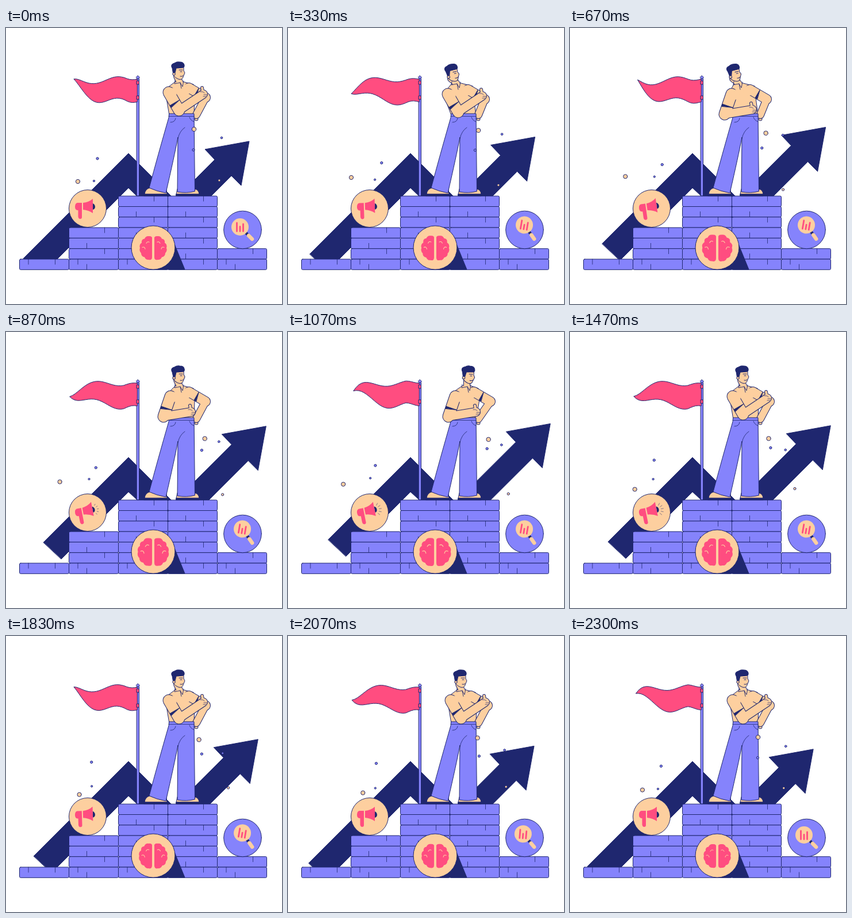
An HTML page with a canvas for the animation above (2.33 s loop, 480 by 480 pixels).

```html
<!DOCTYPE html>
<html lang="en">
<head>
<meta charset="utf-8">
<style>
  html, body { margin: 0; width: 100%; height: 100%; overflow: hidden; background: #fff; }
  canvas { display: block; width: 480px; height: 480px; }
</style>
</head>
<body>
<canvas id="stage" width="480" height="480"></canvas>
<script>
const ctx = document.getElementById('stage').getContext('2d');
const LOOP = 2330, FLAG_PERIOD = 606, TAU = 2 * Math.PI;
const NAVY = '#1f276f', BLUE = '#8583fc', PEACH = '#fdcf9f', PINK = '#ff4d80';

// Smooth 0 to 1 between two times
function ease(t, from, to) {
  const u = Math.min(1, Math.max(0, (t - from) / (to - from)));
  return (1 - Math.cos(Math.PI * u)) / 2;
}
// Rises over [a, b], falls over [c, d]
const pulse = (t, a, b, c, d) => ease(t, a, b) - ease(t, c, d);

function paint(path, fill, stroke = NAVY, width = 1) {
  if (fill) { ctx.fillStyle = fill; ctx.fill(path); }
  if (stroke) { ctx.strokeStyle = stroke; ctx.lineWidth = width; ctx.stroke(path); }
}
const shape = (d, fill, stroke) => paint(new Path2D(d), fill, stroke);
const poly = (points, fill, stroke) => shape('M' + points.join('L') + 'Z', fill, stroke);
const line = (d, color = NAVY, width = 1) => paint(new Path2D(d), null, color, width);
function disc(x, y, r, fill, stroke) {
  const p = new Path2D();
  p.arc(x, y, r, 0, TAU);
  paint(p, fill, stroke);
}
function turned(x, y, angle, draw) {
  ctx.save();
  ctx.translate(x, y);
  ctx.rotate(angle);
  draw();
  ctx.restore();
}
// Segments [from, to, width] share one outline
function limb(...segments) {
  for (const [color, extra] of [[NAVY, 1], [PEACH, -1]])
    for (const [a, b, w] of segments) line(`M${a}L${b}`, color, w + extra);
}
// Dark sleeve opening across the limb from a to b
function cuff([ax, ay], [bx, by], at, half) {
  const len = Math.hypot(bx - ax, by - ay), dx = (bx - ax) / len, dy = (by - ay) / len;
  const x = ax + (bx - ax) * at, y = ay + (by - ay) * at;
  const left = [x - dy * half, y + dx * half], right = [x + dy * half, y - dx * half];
  poly([right, left, [left[0] + dx * 4, left[1] + dy * 4]], NAVY);
}

function drawArrow(t) {
  const d = 33.5 * pulse(t, 0, 1130, 1250, 2350), tail = 1.2 * d, sink = .07 * d;
  const head = [[363, 229], [346, 211], [423, 197], [409, 274], [392, 257]]
    .map(([x, y]) => [x + d, y - 1.13 * d]);
  ctx.save();
  ctx.beginPath();
  ctx.rect(0, 0, 480, 403);
  ctx.clip();
  poly([[30 + tail, 401 - tail], [213, 218], [293.5 - sink, 298.5 - sink], ...head,
    [293, 356 - 2 * sink], [213, 278], [61 + tail, 430 - tail]], NAVY);
  ctx.restore();
}

function drawFlag(t) {
  shape('M227.5 88H231.5V292H227.5Z', BLUE);
  const wave = s => Math.cos(TAU * ((s - .3) / .68 - t / FLAG_PERIOD));
  const reach = 114 - 4 * wave(1);
  const top = [], bottom = [];
  for (let s = 0; s <= 1.001; s += .04) {
    const x = 228 - s * reach, grip = Math.min(1, 5 * s), whip = s ** 6;
    top.push([x, 89 + 12.5 * s ** 4 - wave(s) * grip * (4.5 + 8.5 * whip)]);
    bottom.unshift([x, 128.5 - 27 * s ** 3.5 - wave(s) * grip * (6 + 7 * whip)]);
  }
  poly([...top, ...bottom], PINK);
  for (const y of [92, 118]) shape(`M227.5 ${y}h4v6h-4Z`, PINK);
  shape('M229.5 83l3 3l-3 3l-3 -3Z', BLUE);
}

function drawBlocks() {
  [1, 4, 7, 7, 2].forEach((rows, col) => {
    const x = 23.5 + col * 86;
    for (let r = 0; r < rows; r++) {
      const y = 420.3 - (rows - r) * 18.3;
      const p = new Path2D();
      p.roundRect(x, y, 86, 18.3, 2);
      paint(p, BLUE);
      line(r % 2 ? `M${x + 31} ${y + 9}v9` : `M${x + 62} ${y}v9`, NAVY, .8);
      if (r === rows - 1) line(`M${x + 15.5} ${y}v9`, NAVY, .8);
    }
  });
  poly([[293, 376], [311, 420], [262, 420]], NAVY);
}

function drawMegaphone(t) {
  disc(142, 314, 32.5, PEACH);
  turned(142, 312, -.2 * pulse(t, 100, 1000, 1470, 1950), () => {
    shape('M-10 -8H-18Q-22 -7 -22 -1Q-22 5 -16.5 5V16Q-16 20 -13 20Q-10 20 -10 17Z', PINK, null);
    shape('M9 -7Q13 -5 13 -1Q13 3 9 4Z', NAVY, null);
    shape('M-8 -8Q2 -9 9 -15V10Q2 5 -8 4Z', PINK, null);
    const ray = pulse(t, 700, 1000, 1500, 1750);
    for (let i = -2; i <= 2 && ray > .02; i++) {
      const c = Math.cos(i * .45), s = Math.sin(i * .45), r = 9 + 4 * ray;
      line(`M${8 + 9 * c} ${-1 + 9 * s}L${8 + r * c} ${-1 + r * s}`, NAVY, .5);
    }
  });
}

function drawBrain(t) {
  disc(256, 382, 38, PEACH);
  const size = 1 + .18 * pulse(t, 0, 1070, 1200, 2200);
  for (const side of [-1, 1]) {
    ctx.save();
    ctx.translate(256 + side * 2, 382.5);
    ctx.scale(side * size, size);
    shape('M0 -16Q-1 -21 6 -20.5Q11 -21 13 -16Q19 -15 18 -9Q23 -6 21 0Q23 5 19 9Q19 15 13 16Q11 21 6 20.5Q0 22 0 16Z', PINK, null);
    line('M5 -10Q8 -12 10 -8M17 -1Q13 -3 12 2', PEACH, 1);
    ctx.restore();
  }
}

function drawLens(t) {
  disc(411.5, 351, 32.8, BLUE);
  turned(429, 368, .17 * pulse(t, 0, 330, 1830, 2300), () => {
    line('M-13 -13L-7 -7', NAVY, 5);
    line('M-7 -7L-1 -1', PEACH, 6.5);
    disc(-22, -22, 15, PEACH, null);
    line('M-27.5 -29V-14.5M-22 -22.5V-14.5M-16.5 -27V-14.5', PINK, 2.8);
  });
}

function drawMan(t) {
  const sway = -ease(t, 0, 330) + 2 * ease(t, 670, 1070) - ease(t, 1070, 1470);
  const open = pulse(t, 330, 670, 1070, 1470);
  const dip = Math.max(0, -sway);
  const joint = ([x, y], [ox, oy] = [x, y]) =>
    [x + (ox - x) * open + 5 * sway, y + (oy - y) * open + 3 * dip];
  const shoulder = joint([283, 112], [286, 112]);
  const elbow = joint([301, 143], [274, 147]);
  const hand = joint([343, 115], [322, 139]);
  const farShoulder = joint([318, 104]);
  const farElbow = joint([347, 121]);
  const wrist = [331, 151];
  const [nx, ny] = [302 + 9 * sway, 94 + 2 * dip];
  const [sx, sy] = shoulder, [fx, fy] = farShoulder;

  shape('M250 278Q242 280 241 289H280L279 280Z', PEACH);
  shape('M298 280L296 289H336Q335 280 327 280Z', PEACH);
  shape('M240 289H281V292H240ZM296 289H336V292H296Z', NAVY);

  limb([wrist, [331, 158], 6]);
  poly([[nx - 7, ny - 1], [sx, sy - 10], [sx - 4, sy + 10], [284, 152], [327, 152],
    [fx + 10, fy + 14], [fx + 8, fy - 6], [nx + 8, ny]], PEACH);
  limb([farShoulder, farElbow, 17], [farElbow, wrist, 13]);
  disc(fx - 3, fy + 2, 9, PEACH, null);
  cuff(farShoulder, farElbow, .45, 8);

  shape('M284 149H327L328.5 284Q314 288 298 285L299 190Q293 222 278 287Q262 284 249 278Q264 222 283 156Z', BLUE);
  line('M283 153.5H327.5M311 173Q302 179 299 192M286 164Q294 164 295 157M319 155Q321 161 327 163', NAVY, .8);

  const headX = 299 + 14 * sway, headY = 74 + 4 * dip;
  limb([[headX - 2, headY + 10], [nx, ny], 11]);
  disc(nx, ny + 3, 6.5, PEACH, null);
  turned(nx, ny, 0, () => line('M-8 -3L-9 3L1 1L5 8L7 -2M1 1L3 11', NAVY, .9));

  turned(headX, headY, .08 * sway - .1 * dip, () => {
    shape('M-9 -4L-8 8Q-5 13 1 15Q8 17 9.5 10L12 4L10 0V-8Z', PEACH);
    shape('M-10 -4Q-14 -11 -6 -13Q-2 -16 3 -15Q10 -15 11 -10Q12 -6 9 -5L-3 -4L-5 4L-8 5Z', NAVY);
    disc(-7, 6, 2.3, PEACH);
    line('M2 -1L8 -1M4 2h3M4 10Q7 11 9 9');
  });

  const [x, y] = hand;
  limb([shoulder, elbow, 20], [elbow, hand, 15], [hand, [x - 2, y - 11], 5]);
  disc(sx + 5, sy + 1, 9, PEACH, null);
  cuff(shoulder, elbow, .58, 9.5);
  turned(x, y, 0, () => line('M-5 -4Q0 -5 2 -2M1 1h6M0 4h5', NAVY, .7));
}

// Start point, offset reached half-way, and sideways swing of each loop
const DOTS = [
  { color: PEACH, r: 3.7, start: [327, 176], far: [22, 11], swing: [0, 0] },
  { color: PEACH, r: 3.6, start: [125, 267], far: [-26, 0], swing: [-13, -9] },
  { color: PEACH, r: 2.1, start: [371, 265], far: [15, 15], swing: [-10, 7] },
  { color: BLUE, r: 1.8, start: [375, 191], far: [-3, 8], swing: [-3, -10] },
  { color: BLUE, r: 2.1, start: [326, 212], far: [22, -10], swing: [-6, 3] },
  { color: BLUE, r: 2.1, start: [159, 227], far: [-9, 3], swing: [7, 9] },
  { color: BLUE, r: 1.6, start: [153, 266], far: [-10, -12], swing: [0, 0] }];
function drawDots(t) {
  const angle = TAU * t / LOOP, out = (1 - Math.cos(angle)) / 2, side = Math.sin(angle);
  for (const { color, r, start, far, swing } of DOTS) {
    const [x, y] = start.map((v, i) => v + far[i] * out + swing[i] * side);
    disc(x, y, r, color);
  }
}

const layers = [drawArrow, drawFlag, drawBlocks, drawMegaphone, drawBrain, drawLens, drawMan, drawDots];
ctx.lineCap = ctx.lineJoin = 'round';
function frame(now) {
  ctx.clearRect(0, 0, 480, 480);
  for (const draw of layers) draw(now % LOOP);
  requestAnimationFrame(frame);
}
frame(performance.now());
</script>
</body>
</html>
```
